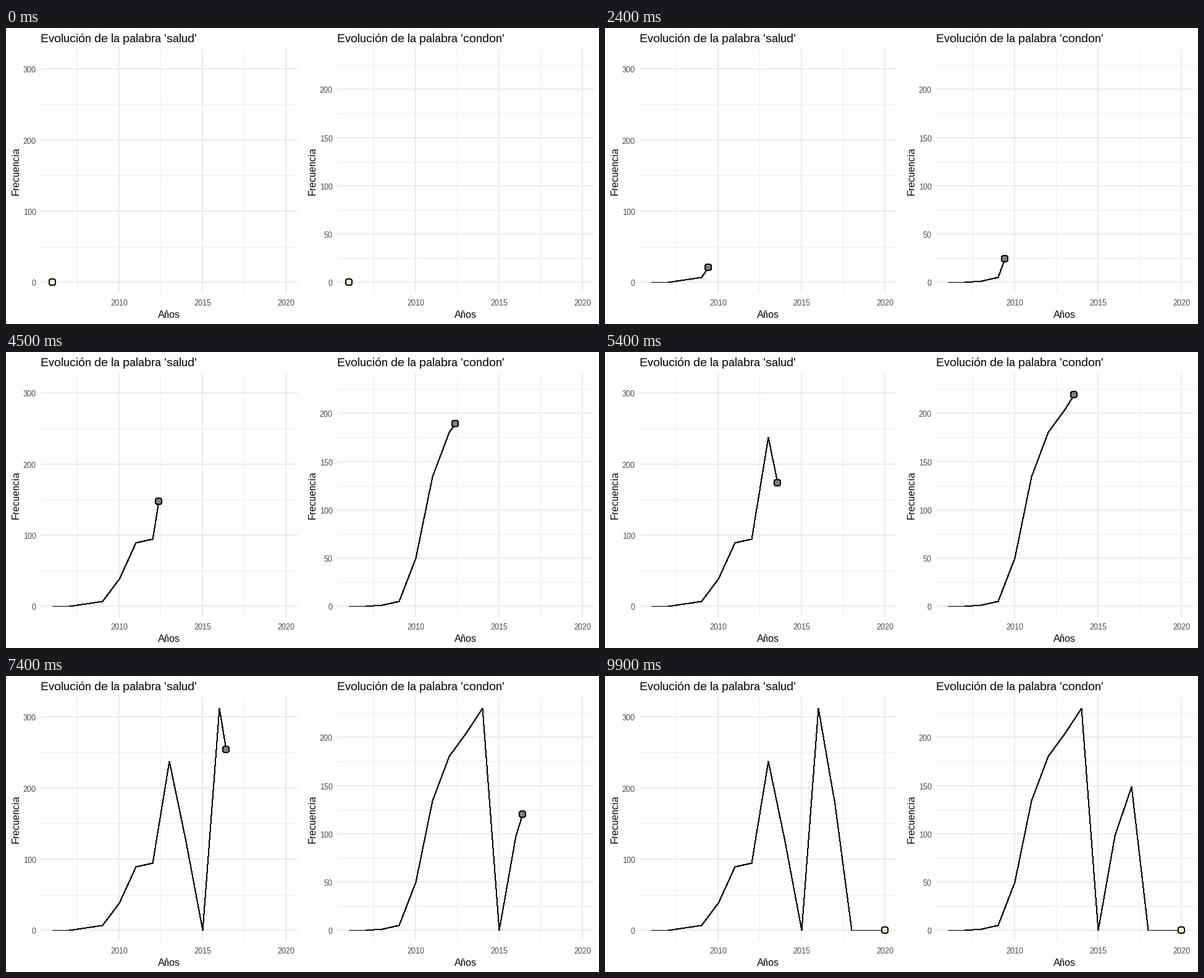
A matplotlib script that plays this animation: 960 by 480 pixels, repeating every 10000 ms.

```python
import numpy as np
import matplotlib.pyplot as plt
from matplotlib.animation import FuncAnimation
from matplotlib.colors import to_rgb
from matplotlib.patches import Circle, Rectangle

plt.rcParams.update({
    "font.family": "Liberation Sans",
    "text.hinting": "native",
    "text.hinting_factor": 1,
    "path.simplify": False,
})

FRAMES, INTERVAL = 100, 100
DPI = 80
PX = 72 / DPI                                  # one pixel in points
LEFT, RIGHT, TOP, BOTTOM = 56, 472, 34, 430    # panel box
X0, YEAR_W = 75.05, 27.0
Y0, SPAN = 412.4, 360.0
GRID, TICK = "#EBEBEB", "#4D4D4D"
CREAM, RED, GREY = "#FFFFBF", "#DD3018", "#7F7F7F"

YEARS = np.arange(15)                          # 2006 to 2020
KNOTS = np.floor(YEARS * (FRAMES - 1) / 14 + 0.5)

SALUD = [0, 0, 3, 7, 38, 89, 94, 237, 125, 0, 312, 177, 0, 0, 0]
CONDON = [0, 0, 1, 5, 50, 134, 180, 204, 230, 0, 98, 149, 0, 0, 0]

M = np.array([[0.4124, 0.3576, 0.1805],
              [0.2126, 0.7152, 0.0722],
              [0.0193, 0.1192, 0.9505]])
WHITE = M.sum(axis=1)


def rgb_to_lab(color):
    c = np.array(to_rgb(color))
    lin = np.where(c > 0.04045, ((c + 0.055) / 1.055) ** 2.4, c / 12.92)
    t = M @ lin / WHITE
    x, y, z = np.where(t > 0.008856, np.cbrt(t), 7.787 * t + 16 / 116)
    return np.array([116 * y - 16, 500 * (x - y), 200 * (y - z)])


def lab_to_rgb(lab):
    y = (lab[0] + 16) / 116
    f = np.array([y + lab[1] / 500, y, y - lab[2] / 200])
    xyz = np.where(f > 0.2069, f ** 3, (f - 16 / 116) / 7.787) * WHITE
    lin = np.clip(np.linalg.solve(M, xyz), 0, 1)
    return np.where(lin > 0.0031308, 1.055 * lin ** (1 / 2.4) - 0.055, 12.92 * lin)


def fill_for(value):
    return {0: CREAM, 1: RED}.get(value, GREY)


fig = plt.figure(figsize=(960 / DPI, 480 / DPI), dpi=DPI, facecolor="white")
ax = fig.add_axes([0, 0, 1, 1])
ax.set_xlim(0, 960)
ax.set_ylim(480, 0)
ax.axis("off")


def label(x, y, text, size, color="black", **kw):
    ax.text(x, y, text, fontsize=size * PX, color=color, va="baseline", **kw)


def bar(x, y, w, h):
    ax.add_patch(Rectangle((x, y), w, h, fc=GRID, lw=0, aa=False, zorder=1))


class Panel:
    def __init__(self, dx, word, values, step):
        self.dx = dx
        self.values = np.array(values, float)
        self.scale = SPAN / max(values)
        self.labs = np.array([rgb_to_lab(fill_for(v)) for v in values])
        self.draw_grid(step)
        self.draw_titles(word)
        self.line, = ax.plot([], [], color="black", lw=PX, aa=False,
                             solid_joinstyle="miter", zorder=3)
        self.dot = Circle((0, 0), 5.5, ec="black", lw=PX, aa=False, zorder=4)
        ax.add_patch(self.dot)

    def to_px(self, year, value):
        x = np.floor(self.dx + X0 + YEAR_W * year)
        return x, np.floor(Y0 - self.scale * value)

    def draw_grid(self, step):
        dx, width, height = self.dx, RIGHT - LEFT, BOTTOM - TOP
        for year in (1.5, 6.5, 11.5):
            bar(self.to_px(year, 0)[0], TOP, 1, height)
        top = (Y0 - TOP) / self.scale
        for v in np.arange(step / 2, top, step):
            bar(dx + LEFT, round(Y0 - self.scale * v), width, 1)
        for v in np.arange(0, top, step):
            y = round(Y0 - self.scale * v)
            bar(dx + LEFT, y - 1, width, 2)
            label(dx + 48.8, y + 6, f"{v:.0f}", 13, TICK, ha="right")
        for year in (4, 9, 14):
            x = self.to_px(year, 0)[0]
            bar(x - 1, TOP, 2, height)
            label(x, 450, str(2006 + year), 13, TICK, ha="center")

    def draw_titles(self, word):
        dx = self.dx
        label(dx + LEFT, 23, f"Evolución de la palabra '{word}'", 19)
        label(dx + 264, 470, "Años", 16, ha="center")
        label(dx + 21, 232, "Frecuencia", 16, ha="center",
              rotation=90, rotation_mode="anchor")

    def update(self, now):
        value = np.interp(now, YEARS, self.values)
        past = YEARS < now
        x, y = self.to_px(np.append(YEARS[past], now),
                          np.append(self.values[past], value))
        self.line.set_data(x + 0.5, y + 0.5)
        self.dot.center = x[-1], y[-1]
        lab = [np.interp(now, YEARS, channel) for channel in self.labs.T]
        self.dot.set_facecolor(lab_to_rgb(np.array(lab)))
        return self.line, self.dot


panels = [Panel(0, "salud", SALUD, 100), Panel(480, "condon", CONDON, 50)]


def draw(frame):
    now = np.interp(frame, KNOTS, YEARS)
    return [artist for p in panels for artist in p.update(now)]


anim = FuncAnimation(fig, draw, frames=FRAMES, interval=INTERVAL,
                     repeat=True, repeat_delay=0, blit=False)
plt.show()
```
